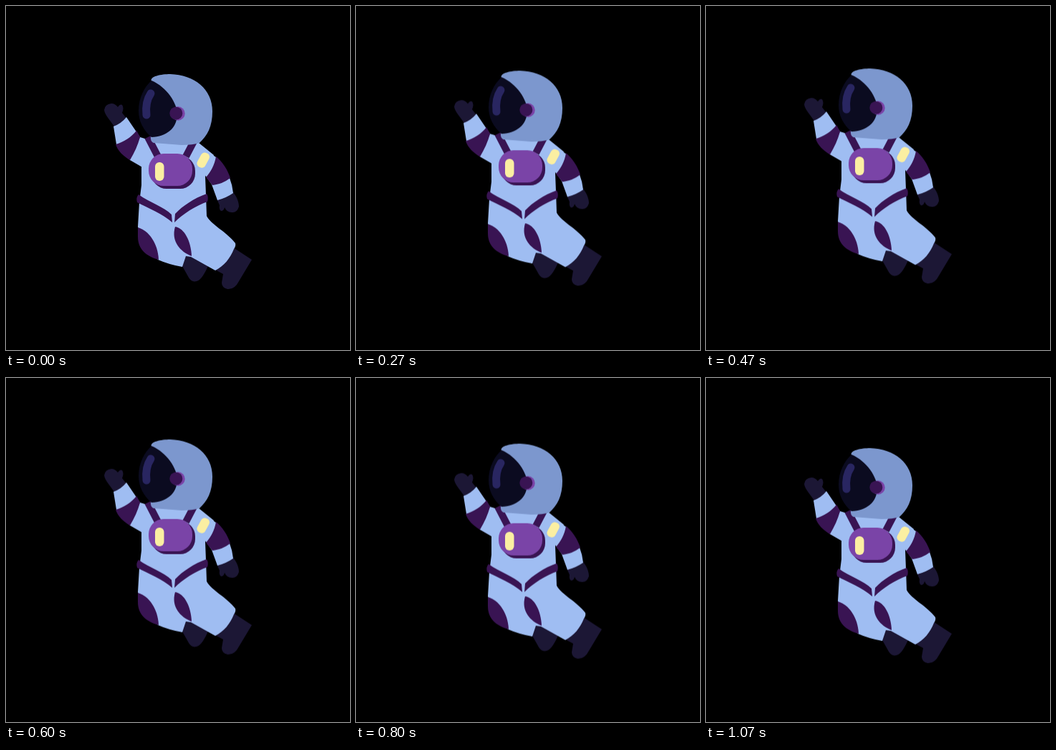
Recreate the animation shown at these times as an HTML page. Size 480 px wide and 480 px high, loop 1.19 s.

```html
<!DOCTYPE html>
<html lang="en">
<head>
<meta charset="utf-8">
<title>Floating astronaut</title>
<style>
  html, body { margin: 0; width: 100%; height: 100%; overflow: hidden; background: #000; }
  svg { display: block; width: 100vw; height: 100vh; }
  .suit { fill: #9fbdf2; }
  .shell { fill: #7c97ce; }
  .trim { fill: #391453; }
  .navy { fill: #1c1735; }
  .glass { fill: #0b0b20; }
  .pack { fill: #7a44a7; }
  .lamp { fill: #fbefa2; }
  .strap { stroke: #391453; stroke-width: 10; }
  .shine { fill: none; stroke: #292661; stroke-width: 11; stroke-linecap: round; }
</style>
</head>
<body>
<svg viewBox="0 0 480 480">
  <g id="astronaut">
    <!-- boots -->
    <path class="navy" d="M252 345L283 361C277 373 273 382 266 384Q259 386 255 379L246 363Z"/>
    <path class="navy" d="M317 337L343 354L325 384Q319 396 309 395Q301 393 301 386L303 374L290 367Z"/>

    <!-- gloves -->
    <path class="navy" d="M152 170C145 158 138 153 137 145Q138 137 147 136Q152 136 156 141Q159 136 162 138Q165 142 162 149L169 158Z"/>
    <path class="navy" d="M294 269L316 259C322 265 325 274 325 280Q322 289 315 288Q308 288 305 281Q304 286 300 286Q297 284 298 278Z"/>

    <!-- arms -->
    <path class="suit" d="M150 168Q161 164 168 155L187 183L200 187L192 226L173 215L154 193Z"/>
    <path class="suit" d="M270 195L293 211L312 240Q316 250 317 261Q307 268 295 271L287 249L275 232Z"/>
    <path class="trim" d="M153 193C164 190 175 183 182 174L187 183C184 194 179 205 173 215C163 209 156 202 153 193Z"/>
    <path class="trim" d="M293 210C302 217 309 228 313 240C305 246 297 249 288 250L279 239C286 231 291 222 293 210Z"/>

    <!-- body and legs -->
    <path class="suit" d="M188 184L203 188L269 191L290 208L278 238L279 264L280 293C287 306 308 315 320 331Q321 335 318 339C313 352 304 363 292 369L258 350L251 349L246 364Q228 361 212 354L190 335L184 308L186 274L189 250L189 224L180 215Z"/>
    <path class="trim" d="M184 309C199 313 212 331 213 354C195 349 184 339 184 322Z"/>
    <path class="trim" d="M236 308C249 310 258 328 259 349C243 343 230 328 236 308Z"/>
    <path class="trim" d="M173 214L187 183L182 174Z"/>

    <!-- belt -->
    <path class="trim" d="M185 263C200 274 220 280 231 291L232 302C219 290 198 282 183 274Q181 267 185 263Z"/>
    <path class="trim" d="M280 262C263 268 246 279 236 290L235 302C247 290 264 279 281 273Q283 267 280 262Z"/>

    <!-- straps and chest unit -->
    <path class="strap" d="M198 183L212 210M262 189L251 210"/>
    <rect class="trim" x="203" y="209" width="61" height="46" rx="21"/>
    <rect class="pack" x="199" y="206" width="61" height="45" rx="21"/>
    <rect class="lamp" x="208" y="218" width="12.5" height="26" rx="6"/>
    <rect class="lamp" x="269" y="204" width="12.5" height="22" rx="5.5" transform="rotate(29 275 215)"/>

    <!-- helmet -->
    <path class="shell" d="M203 105C200 98 217 95 229 95C263 96 288 116 288 147C288 168 281 181 270 191Q261 194 245 194L206 191Q201 189 202 181L215 140Z"/>
    <path class="glass" d="M203 104C224 113 239 135 239 152C238 171 224 182 203 183C192 174 185 161 185 146C185 128 193 113 203 104Z"/>
    <path class="shine" d="M202 122Q194 134 196 152"/>
    <circle class="pack" cx="240" cy="150" r="9.7"/>
    <circle class="trim" cx="237.3" cy="149.7" r="9"/>
  </g>
</svg>
<script>
  const LOOP = 1190, STEPS = 17, TURN = 9;
  const TOP = -9.3, LOW = 2.8;

  const easeOut = u => 1 - (1 - u) ** 1.2;

  // Rise to TOP, then sink to LOW; the loop snaps back to 0.
  const drift = i => i < TURN
    ? TOP * easeOut(i / TURN)
    : TOP + (LOW - TOP) * easeOut((i - TURN) / (STEPS - 1 - TURN));

  // 15 poses per second, on a clock of 10 ms ticks
  const startOf = i => 10 * Math.round(i * 20 / 3);

  const frames = [];
  for (let i = 0; i < STEPS; i++) {
    if (i === 2 || i === 3) continue; // the early pose lingers
    frames.push({
      offset: startOf(i) / LOOP,
      transform: `translateY(${drift(i)}px)`,
      easing: "steps(1, end)"
    });
  }
  frames.push({ offset: 1, transform: `translateY(${LOW}px)` });

  document.getElementById("astronaut").animate(frames, { duration: LOOP, iterations: Infinity });
</script>
</body>
</html>
```
